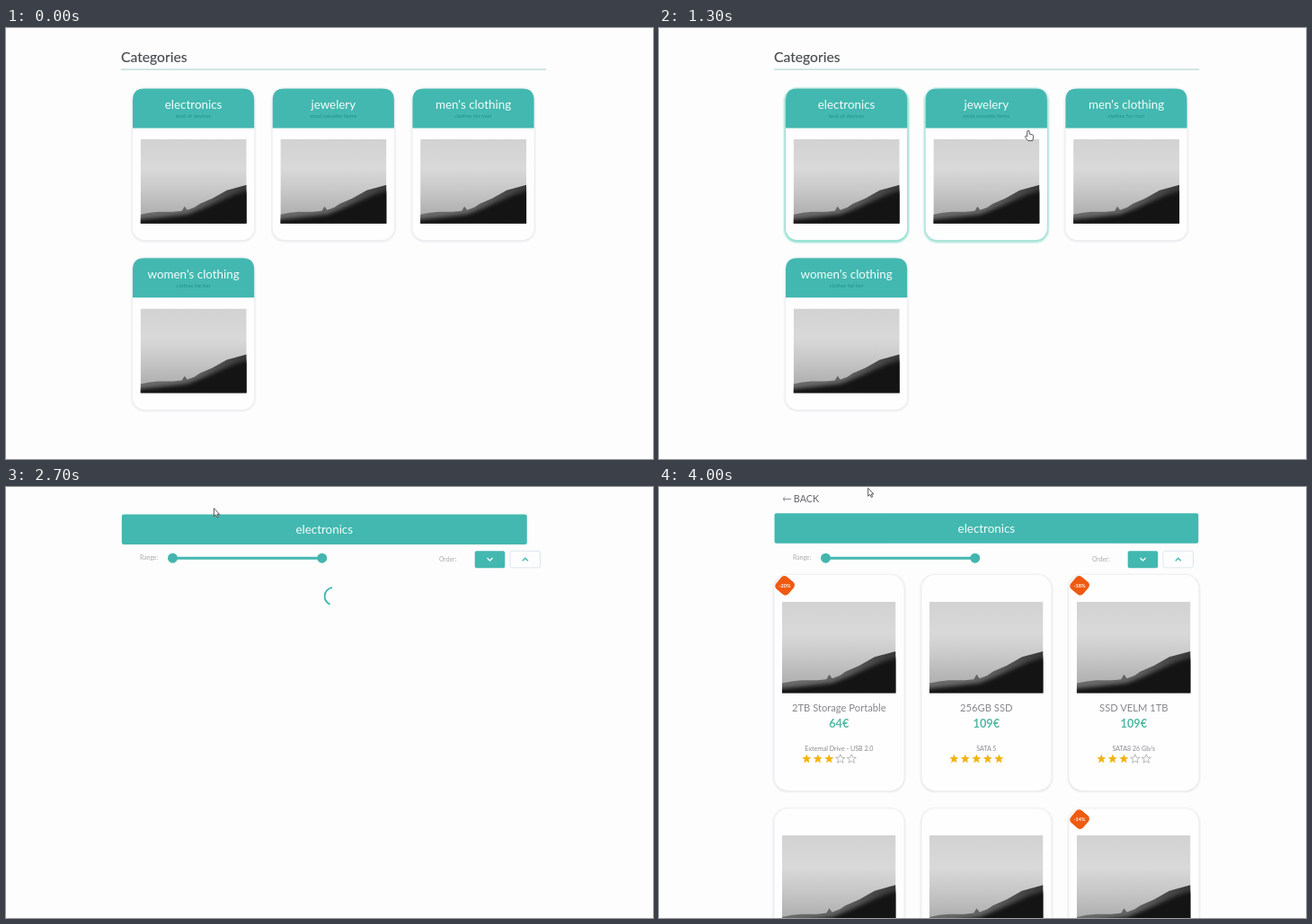
Recreate the animation shown at these times as an HTML page. Size 720 px wide and 480 px high, loop 4050 ms.

```html
<!DOCTYPE html>
<html lang="en">
<head>
<meta charset="utf-8">
<title>Shop categories</title>
<style>
  html, body { margin: 0; width: 100%; height: 100%; overflow: hidden; background: #fdfdfd; }
  svg { display: block; width: 720px; height: 480px; font-family: Lato, "Open Sans", sans-serif; }
  .mid { text-anchor: middle; }
  .title { font-size: 13.4px; fill: #f4fdfb; }
  .halo { filter: blur(1px); }
  .soft { filter: blur(2px); }
</style>
</head>
<body>
<svg id="stage" viewBox="0 0 720 480">
  <defs>
    <linearGradient id="sky" x2="0" y2="1">
      <stop offset="0" stop-color="#d2d2d2"/>
      <stop offset=".35" stop-color="#d9d9d9"/>
      <stop offset=".6" stop-color="#c8c8c8"/>
      <stop offset="1" stop-color="#a6a6a6"/>
    </linearGradient>
    <linearGradient id="ridge" x2="1" y2="0">
      <stop offset="0" stop-color="#6c6c6c"/>
      <stop offset=".5" stop-color="#626262"/>
      <stop offset="1" stop-color="#383838"/>
    </linearGradient>
    <symbol id="photo" viewBox="0 0 118 94" preserveAspectRatio="none">
      <rect width="118" height="94" fill="url(#sky)"/>
      <path d="M0 84 10 82 20 81 36 81 46 80 49 75 52 79 60 76 66 72 80 66 96 57 118 51V94H0Z" fill="url(#ridge)"/>
      <path class="soft" d="M-6 90 25 87 52 84 70 77 88 69 104 62 124 56V100H-6Z" fill="#141414"/>
    </symbol>
    <path id="star" d="M0-5.2 1.4-1.7 5.1-1.5 2.2.8 3.2 4.4 0 2.4-3.2 4.4-2.2.8-5.1-1.5-1.4-1.7Z"/>
  </defs>

  <g id="home">
    <text x="128" y="37.5" font-size="15.7" fill="#474b50" stroke="#474b50" stroke-width=".15">Categories</text>
    <path d="M128 46.2H601" stroke="#b5d6dc" stroke-width="1.2"/>
    <g id="cards"></g>
  </g>

  <g id="shop">
    <g font-size="6.8" fill="#a9a9b0">
      <text x="149" y="81.3">Range:</text>
      <text x="482" y="83">Order:</text>
    </g>
    <rect id="banner" rx="2" fill="#43b8b0"/>
    <text id="bannerText" class="mid title">electronics</text>
    <g fill="#43b5ae">
      <path d="M186 79.2H352" stroke="#43b8b0" stroke-width="3"/>
      <circle cx="185.5" cy="79.2" r="5.5"/>
      <circle cx="351.7" cy="79.2" r="5.5"/>
    </g>
    <rect x="521.7" y="71.3" width="33.5" height="19" rx="2" fill="#43b8b0"/>
    <rect x="561" y="71.3" width="33.5" height="18.5" rx="2" fill="none" stroke="#d3e2ea" stroke-width=".8"/>
    <path d="M535.5 79 538.5 82 541.5 79" fill="none" stroke="#f4fdfb" stroke-width="1.4"/>
    <path d="M574.8 82.3 577.8 79.3 580.8 82.3" fill="none" stroke="#43b8b0" stroke-width="1.4"/>
    <circle id="spinner" r="20.2" fill="none" stroke="#43b8b0" stroke-width="3.8"/>
    <g id="products"></g>
    <g id="back" fill="#65656a">
      <path d="M147 13.4H138M140.3 11.2 138 13.4 140.3 15.6" fill="none" stroke="#85858a" stroke-width="1"/>
      <text x="149.8" y="17.2" font-size="10.8">BACK</text>
    </g>
  </g>

  <g id="cursor">
    <path id="arrow" d="M0 0V9L2.1 7.2 3.6 10.3 5 9.6 3.6 6.7H6.2Z" fill="#fff" stroke="#484848" stroke-width=".9"/>
    <path id="hand" d="M-1.3.8Q0-.8 1.1.8V4L5 5Q5.8 5.3 5.6 6.8L4.8 11.5H-.4L-3.6 7.4Q-3.6 5.8-2.2 6.2L-1.3 7Z" fill="#fff" stroke="#484848" stroke-width=".9"/>
  </g>
</svg>
<script>
const LOOP = 4050, OPEN = 2300, LOADED = 3350;
const $ = id => document.getElementById(id);
const clamp = v => Math.min(1, Math.max(0, v));
const span = (t, a, b) => clamp((t - a) / (b - a));
const smooth = p => p * p * (3 - 2 * p);
const easeOut = p => 1 - (1 - p) ** 3;
const mix = (a, b, p) => a + (b - a) * p;
const set = (el, attrs) => { for (const k in attrs) el.setAttribute(k, attrs[k]); };

// hover pairs are the starts of the glow's fade in and fade out
const categories = [
  { x: 141, y: 67.5, name: "electronics", note: "best of devices", hover: [[980, 1230], [1820, 2400]] },
  { x: 296.7, y: 67.5, name: "jewelery", note: "most valuable items", hover: [[1220, 1450]] },
  { x: 452.4, y: 67.5, name: "men's clothing", note: "clothes for men", hover: [[1440, 1760]] },
  { x: 141, y: 256.3, name: "women's clothing", note: "clothes for her", hover: [] }
];
const CARD = { w: 135.2, h: 168.6, head: 44 };

$("cards").innerHTML = categories.map(({ x, y, name, note }) => {
  const { w, h, head } = CARD, box = `width="${w}" height="${h}" rx="13"`;
  return `<g transform="translate(${x} ${y})">
    <rect class="halo" y=".6" ${box} fill="none" stroke="#dcdce4" stroke-width="1.6"/>
    <rect class="halo glow" y="1.2" ${box} fill="none" stroke="#62d8c0" stroke-width="3.4"/>
    <rect ${box} fill="#fefefe"/>
    <path d="M0 ${head}V13Q0 0 13 0H${w - 13}Q${w} 0 ${w} 13V${head}Z" fill="#43b8b0"/>
    <text class="mid title" x="${w / 2}" y="22.3">${name}</text>
    <text class="mid" x="${w / 2}" y="32.6" font-size="6" fill="#23928c">${note}</text>
    <use href="#photo" x="8.7" y="56.2" width="118" height="94"/>
  </g>`;
}).join("");
const glows = document.querySelectorAll(".glow");

const products = [
  { off: "-20%", name: "2TB Storage Portable", price: "64€", note: "External Drive - USB 2.0", stars: 3 },
  { name: "256GB SSD", price: "109€", note: "SATA 5", stars: 5 },
  { off: "-18%", name: "SSD VELM 1TB", price: "109€", note: "SATA8 26 Gb/s", stars: 3 },
  {}, {}, { off: "-14%" }
];

function badge(label) {
  return `<rect x="-9" y="-9" width="18" height="18" rx="4.5" transform="translate(11.8 11.8) rotate(40)" fill="#ef5a12"/>
    <text class="mid" x="11.8" y="14.2" font-size="5.6" font-weight="700" fill="#fff">${label}</text>`;
}

function details({ name, price, note, stars }) {
  const rating = [0, 1, 2, 3, 4].map(i =>
    `<use href="#star" x="${36 + i * 12.5}" y="204.8" fill="${i < stars ? "#f2b310" : "none"}"
      stroke="${i < stars ? "none" : "#a8a8a8"}" stroke-width=".8"/>`).join("");
  return `<g class="mid">
      <text x="72" y="152.2" font-size="11.2" fill="#86868b">${name}</text>
      <text x="72" y="170.2" font-size="12.7" font-weight="700" fill="#52b8a6">${price}</text>
      <text x="72" y="196" font-size="7.1" fill="#8a8a8f">${note}</text>
    </g>${rating}`;
}

$("products").innerHTML = products.map((p, i) => {
  const x = 128.3 + i % 3 * 164, y = 98 + Math.floor(i / 3) * 260.3;
  const box = `width="144.3" height="240" rx="15"`;
  return `<g transform="translate(${x} ${y})">
    <rect class="halo" y=".5" ${box} fill="none" stroke="#d9d9df" stroke-width="1.6"/>
    <rect ${box} fill="#fefefe"/>
    <use href="#photo" x="8.6" y="29.7" width="126.6" height="101.7"/>
    ${p.name ? details(p) : ""}${p.off ? badge(p.off) : ""}
  </g>`;
}).join("");

// time, x, y
const path = [
  [550, 646, 262], [650, 622, 258], [800, 460, 246], [950, 270, 205], [1050, 215, 160],
  [1150, 240, 132], [1250, 345, 116], [1300, 410.5, 114], [1400, 465, 118], [1550, 520, 126],
  [1650, 512, 125], [1700, 475, 122], [1750, 385, 119], [1800, 275.5, 117.5], [1900, 232, 117],
  [2150, 228, 113], [2350, 228.7, 111], [2500, 229, 88], [2750, 232, 8], [2900, 232.7, 1.2]
];

function cursorAt(t) {
  const next = path.findIndex(p => p[0] > t);
  if (next < 0) return path[path.length - 1].slice(1);
  const [t0, x0, y0] = path[Math.max(0, next - 1)], [t1, x1, y1] = path[next];
  const p = span(t, t0, t1);
  return [mix(x0, x1, p), mix(y0, y1, p)];
}

function drawCursor(t) {
  const [x, y] = cursorAt(t);
  const over = t < OPEN && categories.some(c =>
    x > c.x + 2 && x < c.x + CARD.w - 2 && y > c.y && y < c.y + CARD.h);
  set($("cursor"), { transform: `translate(${x} ${y})`, visibility: t < 550 ? "hidden" : "visible" });
  set($("arrow"), { display: over ? "none" : "inline" });
  set($("hand"), { display: over ? "inline" : "none" });
}

function drawBanner(t) {
  const grow = span(t, OPEN, 2350), move = easeOut(span(t, 2350, 2850));
  const s = Math.max(0, t - 3200) / 1000;
  const spring = 1 - Math.exp(-8 * s) * (Math.cos(17 * s) + 8 / 17 * Math.sin(17 * s));
  const x = mix(141, 128.5, move), y = mix(mix(67.5, 76, grow), 29.3, move);
  const h = mix(44, 33.5, grow);
  const w = mix(mix(135, 282.7, grow), 455.5, move) + 16.3 * spring;
  set($("banner"), { x, y, width: w, height: h });
  set($("bannerText"), { x: x + w / 2, y: y + h / 2 + 4.8 });
}

function drawSpinner(t) {
  const p = Math.max(0, t - 2345) / 1400 % 1;
  const dash = mix(1, 100, smooth(clamp(p * 2)));
  const shift = p < .5 ? 15 * smooth(p * 2) : mix(15, 125, smooth(p * 2 - 1));
  set($("spinner"), {
    transform: `translate(364.5 121.6) rotate(${p * 360}) scale(.49)`,
    "stroke-dasharray": `${dash} 200`, "stroke-dashoffset": -shift,
    display: t < LOADED ? "inline" : "none"
  });
}

function render(t) {
  const home = t < OPEN;
  set($("home"), { display: home ? "inline" : "none" });
  set($("shop"), { display: home ? "none" : "inline" });
  categories.forEach((c, i) => {
    const glow = c.hover.reduce((sum, [on, off]) =>
      sum + smooth(span(t, on, on + 150)) * (1 - smooth(span(t, off, off + 200))), 0);
    set(glows[i], { opacity: glow });
  });
  drawBanner(t);
  drawSpinner(t);
  set($("products"), { opacity: easeOut(span(t, LOADED - 50, LOADED + 250)) });
  const slide = easeOut(span(t, LOADED, 4000));
  set($("back"), { opacity: slide, transform: `translate(${40 * (1 - slide)} 0)` });
  drawCursor(t);
}

const start = performance.now();
function tick() {
  render((performance.now() - start) % LOOP);
  requestAnimationFrame(tick);
}
tick();
</script>
</body>
</html>
```
